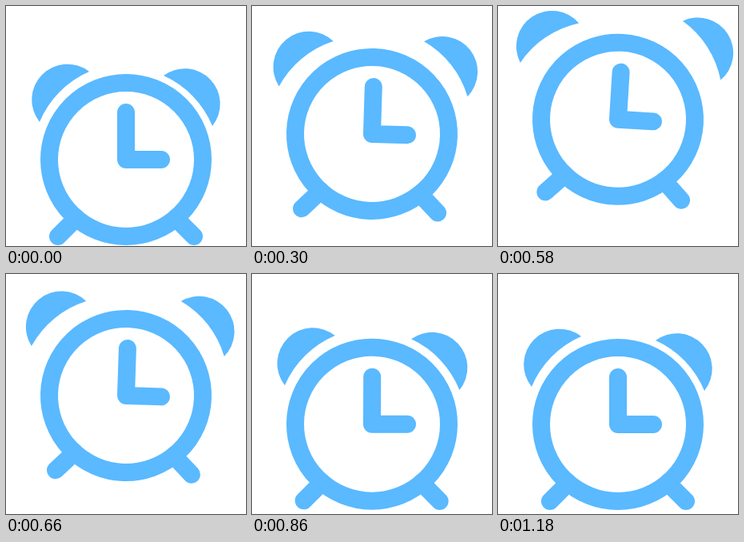
An HTML page that plays this animation: 300 by 300 pixels, repeating every 1.82 s.

```html
<!DOCTYPE html>
<html lang="en">
<head>
<meta charset="utf-8">
<title>Alarm clock</title>
<style>
  html, body { margin: 0; height: 100%; overflow: hidden; background: #fff; }
  svg { display: block; width: 100vw; height: 100vh; }
</style>
</head>
<body>
<svg viewBox="0 0 300 300">
  <g id="clock" fill="none" stroke="#5ab9ff" stroke-width="22" stroke-linecap="round" stroke-linejoin="round">
    <circle r="96"/>
    <path d="M0-59V0H44M-85 96l23-23M85 96l-23-23"/>
    <g fill="#5ab9ff" stroke="none">
      <path id="left" d="M-108-47A44.5 44.5 0 0 1-46-110A118.5 118.5 0 0 0-108-47Z"/>
      <path id="right" d="M47-105A44.2 44.2 0 0 1 108-42A118.5 118.5 0 0 0 47-105Z"/>
    </g>
  </g>
</svg>
<script>
const LOOP = 1820, STEP = 20;
const TOP = 560, LAND = 880, REBOUND = 1080, REST = 1180;
const clock = document.getElementById('clock');
const left = document.getElementById('left');
const right = document.getElementById('right');

// Position of t between a and b, from 0 to 1
const part = (t, a, b) => Math.min(1, Math.max(0, (t - a) / (b - a)));
const bend = (x, k) => x + k * x * (1 - x);

function height(t) {
  if (t < TOP) return 192 - 52.5 * bend(part(t, 0, TOP), 0.3);
  if (t < LAND) return 139.5 + 52.5 * bend(part(t, TOP, LAND), -0.35);
  if (t < REBOUND) return 192 - 8 * bend(part(t, LAND, REBOUND), 1);
  return 186 - 2 * Math.cos(Math.PI * part(t, REBOUND, REST));
}

function moveBell(bell, dx, dy, angle, pivot) {
  bell.setAttribute('transform', `translate(${dx} ${dy}) rotate(${angle} ${pivot})`);
}

function draw(now) {
  const t = Math.floor(now % LOOP / STEP) * STEP;
  const lift = t < TOP ? part(t, 0, TOP) : 1 - part(t, TOP, LAND);
  const shake = lift * Math.cos((t - 580) / 91 * 2 * Math.PI);
  clock.setAttribute('transform', `translate(150 ${height(t)}) rotate(${3.7 * shake})`);
  moveBell(left, -12 * lift, -13.3 * lift, 8.5 * shake, '-84 -99');
  moveBell(right, 21.3 * lift, -16 * lift, 8.5 * shake, '105 -63');
}

const start = performance.now();
function tick() {
  draw(performance.now() - start);
  requestAnimationFrame(tick);
}
tick();
</script>
</body>
</html>
```
